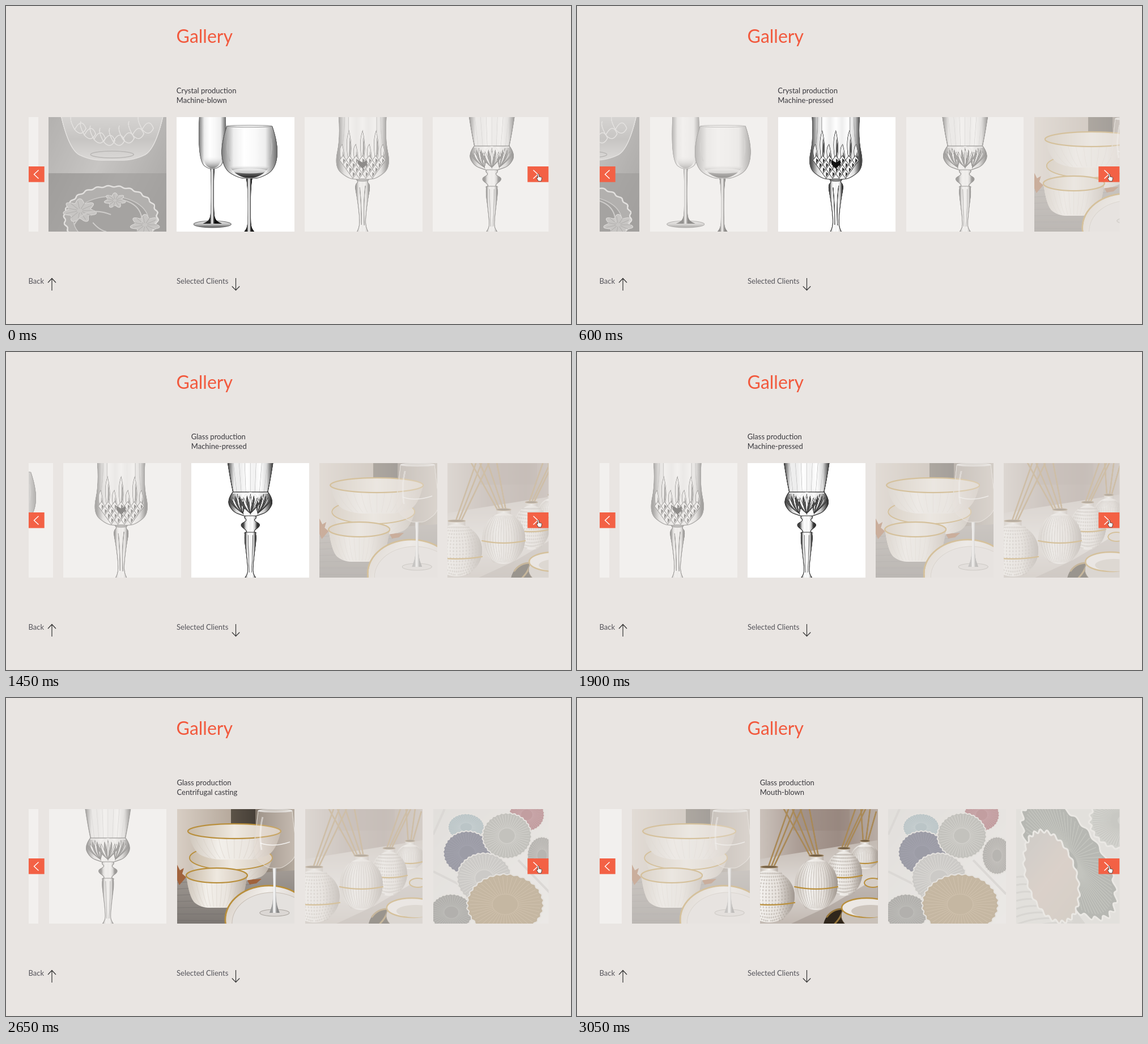
An HTML page with a canvas for the animation above (3100 ms loop, 997 by 561 pixels).

```html
<!DOCTYPE html>
<html lang="en">
<head>
<meta charset="utf-8">
<title>Gallery</title>
<style>
  html, body { margin: 0; width: 100%; height: 100%; overflow: hidden; background: #e9e5e2; }
  canvas { display: block; }
</style>
</head>
<body>
<canvas id="stage" width="997" height="561"></canvas>
<script>
const stage = document.getElementById('stage').getContext('2d');
const LOOP = 3100, STEP = 50, PITCH = 226, LEFT = 301.2, TOP = 196, W = 207.5, H = 202;
const STARTS = [300, 1100, 1900, 2680];
const EASE = [0, .04, .14, .3, .47, .63, .763, .885, .93, .955, .97, .979, .985, .99, .993, .997, 1];
const ORANGE = '#f2593d', BUTTON = '#f36145', GOLD = '#b98f3c';
let g = stage;

// Drawing helpers
const shape = (p, fill, line, width = 1) => {
  if (fill) { g.fillStyle = fill; g.fill(p); }
  if (line) { g.strokeStyle = line; g.lineWidth = width; g.stroke(p); }
};
const path = (d, ...style) => shape(new Path2D(d), ...style);
const rect = (x, y, w, h, fill) => { g.fillStyle = fill; g.fillRect(x, y, w, h); };
const oval = (x, y, rx, ry, ...style) => {
  const p = new Path2D();
  p.ellipse(x, y, rx, ry, 0, 0, Math.PI * 2);
  shape(p, ...style);
};
const blend = (x0, y0, x1, y1, ...colors) => {
  const b = g.createLinearGradient(x0, y0, x1, y1);
  colors.forEach((c, i) => b.addColorStop(i / (colors.length - 1), c));
  return b;
};
const across = (cx, w, ...colors) => blend(cx - w, 0, cx + w, 0, ...colors);
const glass = (cx, w) => across(cx, w, '#444', '#ddd', '#fff', '#f4f4f4', '#fff', '#ccc', '#333');

// Smooth body of revolution from [half width, y] points
function turned(cx, points, ...style) {
  const p = new Path2D();
  const side = list => list.forEach(([x, y], i) => {
    const next = list[i + 1];
    if (i && next) p.quadraticCurveTo(x, y, (x + next[0]) / 2, (y + next[1]) / 2);
    else p.lineTo(x, y);
  });
  side(points.map(([w, y]) => [cx + w, y]));
  p.lineTo(cx - points.at(-1)[0], points.at(-1)[1]);
  const left = points.map(([w, y]) => [cx - w, y]);
  for (let i = left.length - 2; i > 0; i--) {
    const [x, y] = left[i], [px, py] = left[i - 1], [nx, ny] = left[i + 1];
    p.lineTo((x + nx) / 2, (y + ny) / 2);
    if (i > 1) p.quadraticCurveTo(x, y, (x + px) / 2, (y + py) / 2);
    else p.quadraticCurveTo(x, y, px, py);
  }
  p.closePath();
  shape(p, ...style);
}
function frilled(x, y, rx, ry, waves, depth, ...style) {
  const p = new Path2D();
  for (let a = 0; a < 6.283; a += .02) {
    const r = 1 + depth * Math.sin(a * waves);
    p.lineTo(x + rx * r * Math.cos(a), y + ry * r * Math.sin(a));
  }
  p.closePath();
  shape(p, ...style);
}
function rays(x, y, rx, ry, count, inner, color, width = 1) {
  const p = new Path2D();
  for (let i = 0; i < count; i++) {
    const c = rx * Math.cos(i * 6.283 / count), s = ry * Math.sin(i * 6.283 / count);
    p.moveTo(x + c * inner, y + s * inner);
    p.lineTo(x + c, y + s);
  }
  shape(p, null, color, width);
}

function cutBowls() {
  rect(0, 0, W, 99, blend(0, 0, W, 99, '#6a6a6a', '#999', '#606060'));
  turned(112, [[90, -2], [76, 58], [38, 76], [0, 76]], blend(0, 0, 0, 78, '#bbb', '#999', '#ccc'), '#ddd', 1.5);
  for (let i = 0; i < 8; i++) {
    const x = 46 + i * 17, y = 22 + 22 * Math.sin(i * .45);
    path(`M${x} ${y}q12 -22 20 -2q-8 16 -20 2q-10 -18 -6 -24`, null, '#ddd', 1.5);
  }
  oval(112, 66, 38, 6, null, '#777', 1.5);
  rect(0, 99, W, 103, blend(0, 99, W, 202, '#3b3b3b', '#555', '#3f3f3f'));
  frilled(110, 178, 82, 56, 26, .02, '#686868', '#d8d8d8', 2.5);
  oval(110, 182, 66, 42, '#484848', '#a6a6a6', 1.5);
  for (const [x, y, r] of [[55, 165, 25], [117, 147, 16], [170, 190, 22]]) {
    frilled(x, y, r, r * .7, 7, .2, '#999', '#ccc');
    rays(x, y, r, r * .7, 11, .2, '#666');
  }
  path('M45 190q20 -35 65 -18m-32 14q12 14 24 16m28 -56q35 8 35 40', null, '#aaa', 2);
}

function blownGlasses() {
  rect(0, 0, W, H, '#fff');
  const stemTone = cx => across(cx, 4, '#222', '#bbb', '#fff', '#666', '#111');
  oval(63, 189, 33, 6, blend(0, 183, 0, 196, '#f4f4f4', '#bbb', '#444'), '#666');
  turned(63, [[4, 89], [2.8, 105], [2.8, 165], [5, 182], [17, 188]], stemTone(63));
  turned(63, [[23, -2], [25, 40], [20, 82], [7, 91], [0, 91]], across(63, 24, '#777', '#eee', '#fff', '#f8f8f8', '#eee', '#666'), '#666');
  turned(63, [[17, 70], [13, 84], [5, 90], [0, 90]], blend(0, 68, 0, 91, '#fff0', '#777'));
  turned(128, [[6, 106], [3, 120], [2.8, 180], [4, 195], [9, 202]], stemTone(128));
  turned(128.5, [[40, 16], [51, 48], [46, 92], [18, 108], [0, 108]],
    across(128.5, 47, '#888', '#eee', '#fff', '#fafafa', '#eee', '#777'), '#555', 1.1);
  turned(128.5, [[36, 86], [28, 98], [11, 107], [0, 107]], blend(0, 84, 0, 108, '#fff0', '#777', '#222'));
  oval(128.5, 95, 31, 4.5, '#fffa');
  oval(128.5, 16, 40, 1.6, '#fff', '#888');
  path('M91 38q-5 20 3 40M166 37q4 20 -2 37', null, '#bbb', 2);
}

function cutGoblet() {
  rect(0, 0, W, H, '#fff');
  const cx = 102;
  turned(cx, [[42, -2], [39, 36], [50, 88], [26, 108], [9, 110]],
    across(cx, 43, '#555', '#ddd', '#fff', '#eee', '#fff', '#eee', '#fff', '#ddd', '#444'), '#555', 1.2);
  for (let i = -3; i <= 3; i++) {
    const x = cx + i * 12, tip = 24 + Math.abs(i % 2) * 24;
    path(`M${x} ${tip}q8 33 0 ${82 - tip}q-8 -${49 - tip / 2} 0 -${82 - tip}z`, '#eee', '#555', .9);
    path(`M${x + 1} ${tip + 12}q5 22 -1 ${62 - tip}z`, '#555');
  }
  for (let row = 0; row < 4; row++)
    for (let i = -3 + row / 2; i <= 3 - row / 2; i++) {
      const x = cx + i * 11.5, y = 76 + row * 8;
      path(`M${x} ${y - 8}l6 8l-6 8l-6 -8z`, '#f6f6f6', '#444', .9);
      path(`M${x} ${y - 3}l4 3l-4 6z`, '#333');
    }
  path(`M${cx - 8} 76l8 4l8 -4v7l-8 8l-8 -8z`, '#111');
  path('M70 0q0 30 -3 46M134 0q0 30 3 46M77 0v30M127 0v30', null, '#aaa', 1.3);
  turned(cx, [[11, 110], [7, 114], [14, 120], [9, 145], [5, 180], [6, 194], [10, 203]], glass(cx, 11), '#333', 1.1);
  oval(cx, 111, 10, 2, '#999', '#333');
  path(`M${cx + 5} 121q-4 30 -2 70M${cx - 5} 124q3 30 3 66`, null, '#555', 1.5);
}

function shellGoblet() {
  rect(0, 0, W, H, '#fff');
  const cx = 104;
  turned(cx, [[40, -2], [36, 24], [30, 54]], across(cx, 40, '#444', '#eee', '#eee', '#fff', '#f2f2f2', '#fff', '#ddd', '#333'), '#444', 1.5);
  for (let i = -3; i <= 3; i++) path(`M${cx + i * 10} 0L${cx + i * 8} 52`, null, '#ccc', .9);
  turned(cx, [[31, 51], [42, 66], [31, 86], [14, 92], [8, 94]], glass(cx, 37), '#333', 1.2);
  for (const s of [-1, 1, 0])
    for (let i = -3; i <= 3; i++) {
      const tip = cx + s * 23 + i * (s ? 4 : 6), base = cx + s * 13;
      path(`M${base} 89Q${tip - 3} 72 ${tip} ${55 + Math.abs(i) * 3}Q${tip + 4} 68 ${base} 89z`, i % 2 ? '#555' : '#f2f2f2', '#333', .7);
    }
  path('M73 53q14 -2 17 9q14 -20 28 0q4 -11 17 -9', null, '#eee', 1.8);
  turned(cx, [[9, 93], [12, 96], [5, 101], [20, 109], [5, 120], [10, 123]], glass(cx, 12), '#333', 1.1);
  turned(cx, [[9, 122], [11, 130], [7, 160], [4.5, 185], [5, 195], [10, 203]], glass(cx, 9), '#333', 1.1);
  path('M100 127q1 40 2 66M108 127q0 35 -2 66', null, '#777', 1.1);
}

function bowl(x, y, rx, ry, depth, rim) {
  turned(x, [[rx, y], [rx * .9, y + depth * .72], [rx * .5, y + depth], [0, y + depth]],
    across(x, rx, '#cfc6bb', '#f3f0eb', '#eae5df', '#b9aea2'));
  for (let i = -5; i <= 5; i++)
    path(`M${x + i * rx / 6} ${y + ry}Q${x + i * rx / 7} ${y + depth * .7} ${x + i * rx / 10} ${y + depth - 2}`, null, '#cfc6bb66');
  oval(x, y, rx, ry, across(x, rx, '#c9bba8', '#efe9e0', '#d3c8bb'), GOLD, rim);
}

function goldBowls() {
  rect(0, 0, W, H, blend(0, 0, 100, 0, '#d8cec4', '#b5a89b'));
  rect(95, 0, 43, 70, blend(95, 0, 138, 0, '#5c5347', '#463f38'));
  rect(138, 0, 70, 125, blend(138, 0, 207, 0, '#80756a', '#b5aba0'));
  path('M0 122L208 108V202H0z', blend(0, 110, 0, 202, '#a19a94', '#7d7874'));
  for (let i = 0; i < 7; i++) path(`M0 ${130 + i * 11}L130 ${120 + i * 13}`, null, '#6c686577');
  path('M0 98l5 10l7 -4l-3 10l7 6l-12 14l-4 -9zM124 126l10 -6l2 4l13 -1l-9 8l-12 2z', '#a0623c');
  bowl(95, 86, 73, 21, 40, 1.8);
  bowl(101, 39, 82, 13, 50, 2.2);
  bowl(70, 117, 54, 13, 57, 2.3);
  oval(162, 195, 77, 60, blend(90, 140, 200, 200, '#d4cbc2', '#f4f1ed', '#d8d2ce'), GOLD, 2.8);
  oval(168, 201, 71, 54, '#e4e1de', '#c8bfb6');
  oval(172, 183, 26, 6, '#cfcbc777', '#aaa59f');
  turned(172, [[4, 104], [2, 115], [2.5, 165], [9, 183]], across(172, 4, '#999', '#fff', '#ddd', '#888'));
  turned(173, [[30, 3], [34, 40], [40, 82], [14, 104], [0, 104]], '#eee6de44', '#e2dcd5', 1.1);
  oval(173, 3, 30, 2.2, '#fff4', '#eee');
  path('M147 60q23 8 52 -2', null, '#fffc', 1.5);
  path('M151 14q-7 28 -2 58', null, '#fff7', 3);
}

function vase(x, y, rx, ry, band, dotted) {
  rect(x - rx * .34, y - ry - 6, rx * .68, 16, across(x, rx * .34, '#c8c0b8', '#f4f2ef', '#b9b0a8'));
  oval(x, y, rx, ry, across(x, rx, '#cdc6bf', '#f4f2ef', '#e6e1dc', '#a0978f'));
  g.lineCap = 'round';
  for (let i = -7; i <= 7; i++) {
    if (dotted) g.setLineDash([1, 5]);
    path(`M${x + i * rx / 15} ${y - ry + 5}Q${x + i * rx / 5.4} ${y} ${x + i * rx / 15} ${y + ry - 3}`, null, '#a9a09877', dotted ? 2.6 : 1.3);
  }
  g.setLineDash([]);
  path(`M${x - rx} ${band}q${rx} 8 ${rx * 2} 0`, null, GOLD, 2.2);
  oval(x, y - ry - 6, rx * .34, 2, '#6d5a40', '#a89070');
}

function diffusers() {
  rect(0, 0, W, H, blend(0, 0, W, 0, '#cbc2bb', '#ab9d95', '#9c8c84', '#b9ada5'));
  rect(58, 0, 100, 38, '#8f7f7755');
  path('M0 88L207 55V202H0z', blend(0, 60, 0, 202, '#c4bbb4', '#dfdad6', '#c2b9b2'));
  path('M55 202L120 172L208 120V202z', '#8e837b66');
  const sticks = d => path(d, null, '#a98957', 2.6);
  sticks('M182 60L178 0M186 60L194 0M189 60L205 4');
  vase(185, 84, 25, 22, 92);
  sticks('M143 72L168 0M147 72L181 0M151 72L186 0');
  vase(148, 114, 32, 39, 117, true);
  sticks('M89 84L42 0M93 84L57 0M99 84L71 0M103 84L87 0');
  vase(99, 133, 38, 45, 137);
  sticks('M13 106L50 0M18 106L60 0M22 106L73 0');
  vase(16, 154, 45, 46, 165, true);
  oval(199, 130, 15, 8, '#d5cdc6', GOLD, 2);
  path('M112 202q6 -24 36 -28l12 28z', '#2f261c');
  path('M118 190q10 -14 28 -14q-2 14 -14 26', null, '#96763c', 3);
  oval(188, 188, 45, 28, '#c9c1b9', '#5d4d36');
  oval(188, 174, 44, 17, '#ece8e4', GOLD, 2.5);
  oval(195, 180, 34, 11, '#cdc5bd');
}

function plates() {
  rect(0, 0, W, H, blend(0, 0, W, H, '#d9d7d4', '#efeeec'));
  path('M20 0L0 45M150 90L208 150M0 110L60 140', null, '#c8c6c3', 4);
  const plate = (x, y, rx, ry, color, shade) => {
    frilled(x, y, rx, ry, 34, .018, color, '#e0deda', 2);
    rays(x, y, rx * .93, ry * .93, 46, .36, shade, 1);
    oval(x, y, rx * .34, ry * .34, null, shade);
  };
  plate(58, 32, 32, 24, '#7d9aa3', '#98b0b8');
  plate(165, 10, 31, 29, '#8d3c46', '#a05560');
  plate(192, 82, 26, 33, '#74726e', '#94928d');
  plate(60, 77, 42, 38, '#333754', '#454967');
  plate(130, 47, 43, 40, '#90928b', '#b6b7b1');
  plate(32, 182, 38, 32, '#666864', '#858783');
  plate(90, 122, 48, 44, '#a4a5a2', '#c8c7c3');
  plate(127, 168, 67, 53, '#94774a', '#ad9066');
}

function leaves() {
  rect(0, 0, W, H, '#d8d8d5');
  for (let i = 0; i < 12; i++) path(`M0 ${120 + i * 14}Q50 ${110 + i * 12} 120 202`, null, '#c0c0bc', 3);
  const leaf = (x, y, rx, ry, turn, color, vein) => {
    g.save();
    g.translate(x, y);
    g.rotate(turn);
    frilled(0, 0, rx, ry, 25, .035, color, '#ecebe6', 3);
    if (vein) rays(0, 0, rx * .92, ry * .92, 70, .2, vein, 1.6);
    g.restore();
  };
  leaf(190, 20, 60, 50, 0, '#b4b7b1', '#9ca199');
  leaf(93, 88, 56, 122, -.6, '#737a72', '#8f968d');
  leaf(62, 119, 44, 83, -.3, blend(-40, -60, 40, 60, '#b0aca5', '#c7b5a9', '#bcb0a2'));
}

function tile(paint) {
  const c = document.createElement('canvas');
  c.width = W * 2;
  c.height = H * 2;
  g = c.getContext('2d');
  g.scale(2, 2);
  paint();
  return c;
}
const blank = () => rect(0, 0, W, H, '#fff');
const tiles = [blank, cutBowls, blownGlasses, cutGoblet, shellGoblet, goldBowls, diffusers, plates, leaves].map(tile);
const labels = [
  ['Crystal production', 'Machine-blown'], ['Crystal production', 'Machine-pressed'],
  ['Glass production', 'Machine-pressed'], ['Glass production', 'Centrifugal casting'],
  ['Glass production', 'Mouth-blown']
];
g = stage;

const clamp = v => Math.max(0, Math.min(1, v));
function ease(ms) {
  const p = Math.max(0, Math.min(EASE.length - 1, ms / STEP)), i = Math.floor(p);
  return EASE[i] + ((EASE[i + 1] ?? 1) - EASE[i]) * (p - i);
}
const sum = f => STARTS.reduce((total, start) => total + f(start), 0);
function text(s, x, y, color, size = 13) {
  g.font = `${size}px Lato, sans-serif`;
  g.fillStyle = color;
  g.fillText(s, x, y);
}

function controls() {
  rect(40, 283, 27.7, 27.6, BUTTON);
  rect(920.3, 283, 37, 27.6, BUTTON);
  path('M57.5 289.5L49.5 297L57.5 304.5M930.5 289.5L938.5 297L930.5 304.5', null, '#fff', 1.4);
  path('M938 297q1.5 -1.5 2.5 0v4l4 1q1 0 1 2l-1 5h-5l-3 -5q0 -2 2 -1z', '#fff', '#333', .8);
  path('M81 502V480.5M74 488L81 480.5L88 488M405.5 480V501.5M398.8 494.5L405.5 501.5L412.2 494.5', null, '#333', 1.2);
  text('Gallery', 300.6, 65, ORANGE, 32);
  text('Back', 39.5, 490, '#55545a');
  text('Selected Clients', 301, 490, '#55545a');
}

function draw(now) {
  const t = Math.floor(now % LOOP / STEP) * STEP;
  const scroll = sum(s => ease(t - s)), active = sum(s => clamp((t - s) / 250));
  g.globalAlpha = 1;
  rect(0, 0, 997, 561, '#e9e5e2');
  g.save();
  g.beginPath();
  g.rect(40, 130, 917.5, 280);
  g.clip();
  tiles.forEach((image, n) => {
    const i = n - 2, x = LEFT + (i - scroll) * PITCH, focus = clamp(1 - Math.abs(i - active));
    g.globalAlpha = .42 + .58 * focus;
    g.drawImage(image, x, TOP, W, H);
    g.globalAlpha = focus;
    labels[i]?.forEach((line, row) => text(line, x - .4, 153.6 + row * 17.8, '#39383d'));
  });
  g.restore();
  controls();
  requestAnimationFrame(draw);
}
requestAnimationFrame(draw);
</script>
</body>
</html>
```
